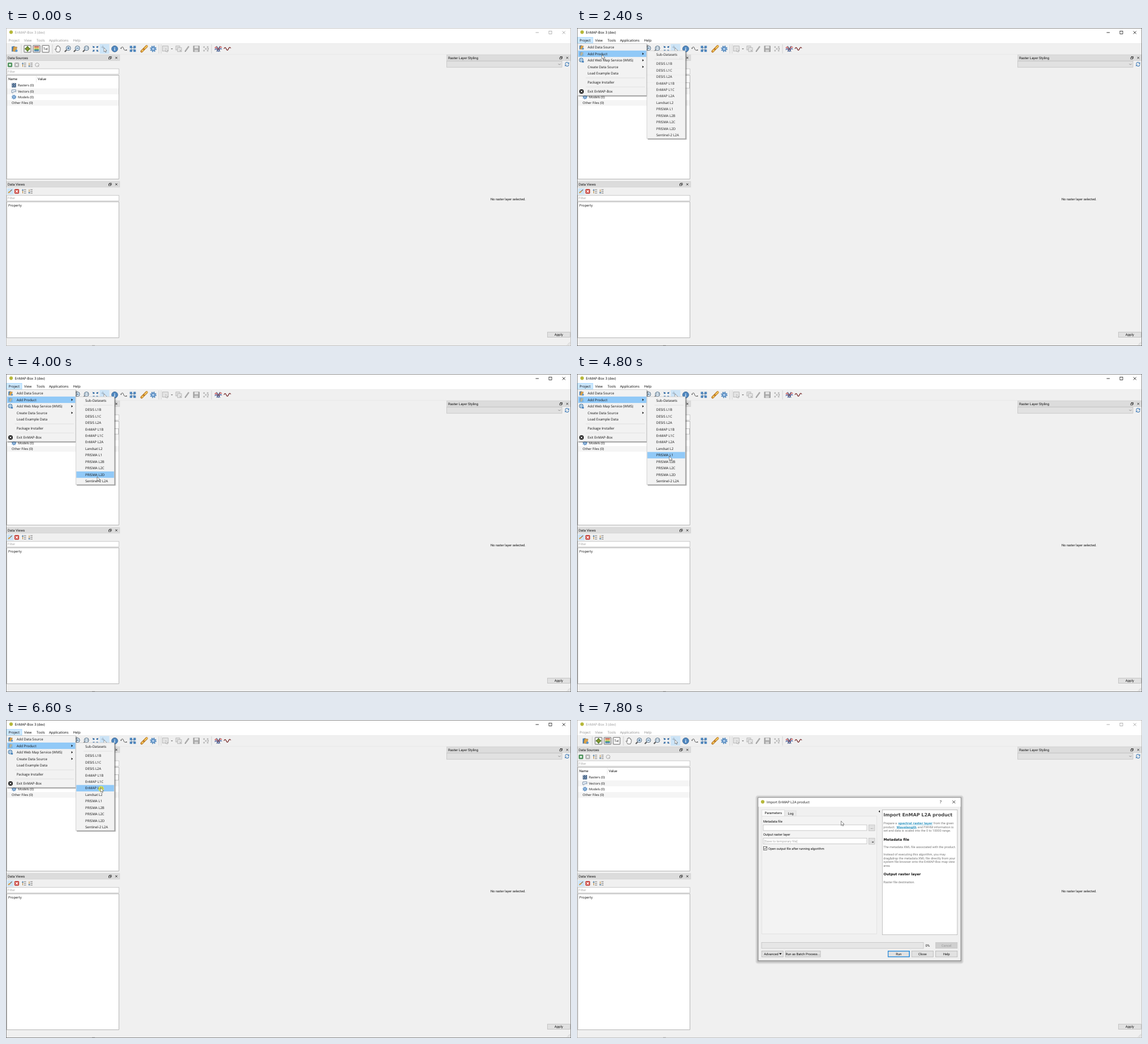
Recreate the animation shown at these times as an HTML page. Size 998x561 px, loop 8000 ms.

```html
<!DOCTYPE html>
<html lang="en">
<head>
<meta charset="utf-8">
<title>EnMAP-Box product import</title>
<style>
html, body { margin: 0; width: 100%; height: 100%; overflow: hidden; background: #f0f0f0; }
svg { display: block; width: 100%; height: 100%; }
text { font-family: "Open Sans", "Noto Sans", sans-serif; white-space: pre; text-rendering: geometricPrecision; }
.ui { font-family: Roboto, Arial, sans-serif; }
.b { font-family: "DejaVu Sans", sans-serif; font-weight: bold; }
</style>
</head>
<body>
<svg id="stage" viewBox="0 0 998 561"></svg>
<script>
const BLUE = '#4f86bd', INK = '#111', GRAY = '#a5a5a5', PICK = '#91c9f7';

// Drawing helpers
const rect = (x, y, w, h, fill, stroke = 'none', more = '') =>
  `<rect x="${x}" y="${y}" width="${w}" height="${h}" fill="${fill}" stroke="${stroke}" stroke-width=".7" ${more}/>`;
const line = (d, stroke = INK, w = 0.8, fill = 'none', more = '') =>
  `<path d="${d}" fill="${fill}" stroke="${stroke}" stroke-width="${w}" ${more}/>`;
const shape = (d, fill) => `<path d="${d}" fill="${fill}"/>`;
const disc = (x, y, r, fill, stroke = 'none', w = 0.8) =>
  `<circle cx="${x}" cy="${y}" r="${r}" fill="${fill}" stroke="${stroke}" stroke-width="${w}"/>`;
const text = (x, y, s, size = 6.05, fill = INK, more = '') =>
  `<text x="${x}" y="${y}" font-size="${size}" fill="${fill}" ${more}>${s}</text>`;
const ui = (x, y, s, size = 5.7, fill = INK, more = '') => text(x, y, s, size, fill, 'class="ui" ' + more);
const bold = (x, y, s, size, fill) => text(x, y, s, size, fill, 'class="b"');
const at = (x, y, body) => `<g transform="translate(${x} ${y})">${body}</g>`;
const group = (id, body) => `<g id="${id}">${body}</g>`;
const cross = (x, y, r, stroke = INK, w = 0.8) =>
  line(`M${x - r} ${y - r}l${2 * r} ${2 * r}m0 ${-2 * r}l${-2 * r} ${2 * r}`, stroke, w);

// Icons, centred on 0,0
const gear = r => disc(0, 0, r * 0.55, '#a9c8e8', BLUE, r * 0.28) +
  disc(0, 0, r * 0.85, 'none', BLUE, r * 0.3).replace('/>', ` stroke-dasharray="${r * 0.334}"/>`);
const lens = mark => line('M-2 2l-3.2 3.2', '#555', 2) + disc(1.2, -1.2, 4, '#dcebf7', '#52697f', 1) + mark;
const boxed = body => rect(-6, -6, 12, 12, '#fff', '#222', 'rx=".5"') + body;
const squares = (c, s) => [-1, 1].map(i => [-1, 1].map(j =>
  rect(i * 3.2 - s / 2, j * 3.2 - s / 2, s, s, c)).join('')).join('');
const sheets = shape('M-5 -4l5 -1v9l-5 1z', BLUE) + shape('M-1.5 -4l6 1l-2 8l-6 -1z', '#dba349') +
  line('M-1.5 -4l6 1l-2 8l-6 -1z', '#765c37', .5) + disc(3.4, 3.3, 2.2, '#5c98cf');
const pointer = line('M0 0V9l2 -1.8l1.4 3l1.5 -.7l-1.4 -2.9h2.8z', '#222', .6, '#fff');
const wave = (c, dy = 0) => line(`M-6 ${dy}q2 -5 4 0t4 0t4 -1`, c, 1.2);
const vector = line('M-4 2.5V-1.5q0 -1.5 2 -1h5.5v3.5h-4l-1.2 2z', '#657b96', .8, '#e4edf6');
const raster = rect(-3.7, -3.7, 7.4, 7.4, '#26466d') +
  [0, 1, 2, 3].map(i => rect(-3.2 + i % 2 * 3.4, -3.2 + (i >> 1) * 3.4, 1.6, 1.6, '#dce7f2') +
    rect(-1.5 + i % 2 * 3.4, -1.5 + (i >> 1) * 3.4, 1.4, 1.4, '#86a9cc')).join('');
const tree = up => [-3, 0, 3].map(y => line(`M-.5 ${y}h4`, '#777', 1)).join('') +
  line(`M-2.5 3.5v-7${up ? '' : 'm0 7'}`, '#b88432', 1) +
  shape(up ? 'M-4.2 -1.5l1.7 -2.7l1.7 2.7z' : 'M-4.2 1.5l1.7 2.7l1.7 -2.7z', '#4c82b6');
const floatBox = (x, y) => rect(x - 1, y - 2, 3.2, 3, 'none', INK) + rect(x - 2.3, y - .6, 3.2, 2.8, '#eee', INK);
const brush = line('M-3.5 2.5L0 0', '#d99531', 2) + line('M0 0l3 -3', '#76532f', 1.1);

const tools = [
  [15, sheets],
  [38, boxed(shape('M0 -5l5 5l-5 5l-5 -5z', '#608f30') + disc(0, 0, 2, '#efc948') + line('M-5 0h10M0 -5v10', '#335520', .7))],
  [54, boxed(['#b74a3c', '#e4b440', '#4c9c58', '#3976ad'].map((c, i) => rect(-4.3, -4.5 + i * 2.3, 8.6, 1.9, c)).join(''))],
  [70, boxed(text(0, 2.1, 'Txt', 6, INK, 'text-anchor="middle"'))],
  [92, line('M-2.5 5.5q-1.5 -3 -3 -5q1.2 -1.3 2.4 .6V-4q1.1 -1.6 1.8 0V-5.3q1.1 -1.2 1.8 0V-4.5q1.2 -1 1.8 .5V-2.5q1.1 -.9 1.7 .4q.4 5 -1.7 7.6z', '#333', .7, '#fff')],
  [109, lens(line('M-1 -1.2h4.4m-2.2 -2.2v4.4', '#325f8c', 1))],
  [125, lens(line('M-1 -1.2h4.4', '#325f8c', 1))],
  [141, lens(text(-1.5, .6, '1:1', 4.3, '#222'))],
  [158, squares(BLUE, 3) + line('M-5 -5l3 3M5 -5l-3 3M5 5l-3 -3M-5 5l3 -3', '#315d8b', 1) + rect(-1.5, -2, 4, 3, '#f1f5f9')],
  [174, rect(-8.5, -8.5, 17, 17, '#cce4f7') + line('M-6 -3h5M-3 -6v5', '#8596a4', .6) + at(-1, -2, `<g transform="scale(.8)">${pointer}</g>`)],
  [192, disc(0, 0, 5.4, '#4f87bf', '#315f90') + text(0, 2.8, 'i', 8, '#fff', 'text-anchor="middle" font-weight="700"')],
  [208, line('M-5 -1q3 -5 4.5 0t5 3', '#555', 1) + disc(-4.7, -1, .9, '#444') + disc(4.8, 2, .9, '#444')],
  [224, squares(BLUE, 4.3) + rect(-2, -2, 4, 4, '#e9f1f8', '#44698e')],
  [244, line('M-4.5 4.5l9 -9', '#bd7922', 4.2, 'none', 'stroke-linecap="round"') + line('M-4.5 4.5l3 -3m2 -2l5 -5', '#f9d46b', 1.8)],
  [260, gear(5.8)],
  [282, rect(-5.5, -5, 10, 9, '#e4e4e4', GRAY) + at(0, -1, `<g opacity=".45" transform="scale(.7)">${pointer}</g>`)],
  [293, shape('M-1.8 -.8h3.6l-1.8 2z', '#777')],
  [305, rect(-5, -5, 7, 7, '#e2e2e2', GRAY) + rect(-2, -2, 7, 7, '#e8e8e8', GRAY) + cross(3, 3, 1.5, GRAY)],
  [320, line('M-3.5 4.5L3 -4.5', '#aaa', 2.4) + line('M-4 5.3l1 -1.4', '#777', 1)],
  [336, rect(-5, -5, 10.5, 10, '#aaa', '#888') + rect(-3, -5, 6.5, 4, '#e5e5e5') + rect(-3, 1.5, 6, 3.5, '#d4d4d4')],
  [353, squares('#b7b7b7', 2.6) + disc(0, 0, 1.6, '#bbb') + disc(4, 0, 1.2, '#aaa')],
  [375, wave('#c33a3a', -1) + wave('#334e93', 2) + line('M-3 -5l6 10M3 -5l-6 10', '#304d78', 1)],
  [391, wave('#701e1e')]
];

const dockTitle = (x, y, w, s) => rect(x, y - 5, w, 10, '#dcdcdc', '#cecece') + ui(x + 2.6, y + 2.1, s, 6.05) +
  floatBox(x + w - 17, y) + cross(x + w - 6, y, 1.7, INK, .8);
const field = (x, y, w, h, hint = '') => rect(x, y, w, h, '#fff', '#b5b5b5') + ui(x + 1.5, y + h / 2 + 2.1, hint, 5.8, '#aaa');
const button = (x, y, w, s, stroke = '#adadad', fill = '#e1e1e1', ink = INK) =>
  rect(x, y, w, 10.5, fill, stroke) + ui(x + w / 2, y + 7.3, s, 5.8, ink, 'text-anchor="middle"');

const chrome = rect(0, 0, 998, 27, '#fff') + disc(9, 7.3, 3.1, '#b6b83b') +
  group('caption', text(15.5, 10.2, 'EnMAP-Box 3 (dev)', 6.1, 'currentColor') +
    line('M935.5 8h5.5', 'currentColor') + rect(959, 5.5, 5, 5, 'none', 'currentColor') + cross(985.3, 8, 2.5, 'currentColor')) +
  group('hot', rect(1, 16.5, 27, 10.5, '#cce8ff', '#99d1ff')) +
  group('menubar', [[4.5, 'Project'], [32, 'View'], [54, 'Tools'], [76, 'Applications'], [118.5, 'Help']]
    .map(([x, s]) => text(x, 23.8, s, 6.05, 'currentColor')).join(''));

const toolbar = line('M0 27.5h998M0 46.5h998', '#e4e4e4', .6) +
  [27, 82, 270, 274, 363].map(x => line(`M${x} 29v16`, '#c6c6c6', .7)).join('') +
  tools.map(([x, body]) => at(x, 36.8, body)).join('');

const sources = dockTitle(.4, 52.6, 200.5, 'Data Sources') +
  at(7, 65, rect(-3.6, -3.6, 7.2, 7.2, '#529b61', '#367644', 'rx="1"') + line('M-2 0h4M0 -2v4', '#fff', 1.3)) +
  at(19, 65, rect(-3.6, -3.6, 7.2, 7.2, '#bbb', '#999', 'rx="1"') + cross(0, 0, 1.7, '#fff', 1.2)) +
  at(32, 65, tree(true)) + at(43.5, 65, tree(false)) +
  at(55, 65, disc(0, 0, 3.3, 'none', '#aaa', 1) + line('M.8 .8l2.6 2.6', '#aaa', 1)) +
  field(1.5, 72, 198, 9.6, 'Filter') + rect(1.5, 83.5, 198, 183, '#fff', '#999') +
  rect(2, 106.5, 197, 10.5, '#f5f5f5') + rect(2, 127.2, 197, 10, '#f5f5f5') +
  ui(4, 92, 'Name', 6) + ui(56, 92, 'Value', 6) + line('M53.5 84v12', '#ddd', .6) +
  group('focus', rect(10, 96.3, 188.7, 9.8, 'none', '#aaa')) +
  at(14, 101, raster) + at(14, 111.5, vector) + at(14, 121.8, gear(4.2)) +
  ['Rasters (0)', 'Vectors (0)', 'Models (0)', 'Other Files (0)']
    .map((s, i) => text(i < 3 ? 21 : 10, 103.2 + i * 10.4, s, 5.8)).join('');

const views = dockTitle(.4, 275.8, 200.5, 'Data Views') +
  rect(1.8, 282.8, 11.5, 10.8, '#cce4f7') + at(7.5, 288.2, brush) +
  at(19, 288.2, rect(-3.7, -3.7, 7.4, 7.4, '#d3443e', '#a52c28', 'rx="1"') + cross(0, 0, 2, '#fff', 1.3)) +
  at(32, 288.2, tree(true)) + at(43.5, 288.2, tree(false)) +
  field(1.5, 295.2, 198, 9.8, 'Filter') + rect(1.5, 306.8, 198, 239.5, '#fff', '#999') + text(4, 315.3, 'Property', 5.9);

const styling = dockTitle(778.4, 52.6, 219, 'Raster Layer Styling') +
  rect(778.5, 58.6, 203.5, 10.6, '#e1e1e1', '#bdbdbd') + line('M975.5 63l2 2l2 -2', '#777') +
  at(991, 64, line('M-3.2 -.5a3.2 3.2 0 0 1 5.8 -1.5M3.2 .5a3.2 3.2 0 0 1 -5.8 1.5', BLUE, 1.3) +
    shape('M3.8 -3.8v3.2h-3.2zM-3.8 3.8V.6h3.2z', BLUE)) +
  ui(856, 304.3, 'No raster layer selected.', 5.75) + rect(956.5, 536.7, 40, 8.8, '#e1e1e1', '#b5b5b5') +
  ui(976.3, 543.2, 'Apply', 6, INK, 'text-anchor="middle"') +
  line('M991 559.5l5.5 -5.5m-3 5.5l3 -3', '#bbb', .7) + line('M152 560.3h5', '#777', .8);

// Popup menus: each entry is [row centre, label, opens submenu]
const mainRows = [[34, 'Add Data Source'], [45.4, 'Add Product', 1], [57, 'Add Web Map Service (WMS)', 1],
  [68.4, 'Create Data Source', 1], [80, 'Load Example Data'], [96, 'Package Installer'], [112, 'Exit EnMAP-Box']];
const subRows = ['DESIS L1B', 'DESIS L1C', 'DESIS L2A', 'EnMAP L1B', 'EnMAP L1C', 'EnMAP L2A', 'Landsat L2',
  'PRISMA L1', 'PRISMA L2B', 'PRISMA L2C', 'PRISMA L2D', 'Sentinel-2 L2A'].map((s, i) => [63 + i * 11.45, s]);
subRows.unshift([47.2, 'Sub-Datasets']);

const popup = (id, x, y, w, h, tx, rows, seps, extra = '') => group(id,
  rect(x + 2, y + 2, w + 1, h, '#000', 'none', 'opacity=".18"') + rect(x + 1.5, y + 1.5, w, h, '#000', 'none', 'opacity=".3"') +
  rect(x, y, w, h, '#f2f2f2', '#c4c4c4') + rect(x + 1, 0, w - 1.5, 11.3, PICK, 'none', `id="${id}Pick"`) + extra +
  seps.map(s => line(`M${tx - 3} ${s}H${x + w - 3}`, '#d5d5d5', .6)).join('') +
  rows.map(([c, s, more]) => text(tx, c + 2.2, s) + (more ? shape(`M${x + w - 7.5} ${c - 2}l2.6 2l-2.6 2z`, INK) : '')).join(''));

const menus = popup('menu', 1, 27.6, 122, 91.4, 18.7, mainRows, [88, 104],
    at(8, 34, `<g transform="scale(.75)">${sheets}</g>`) +
    at(8, 45.4, `<g transform="scale(.7)" opacity=".5">${sheets}</g>`) +
    at(8, 57, disc(-.5, -.5, 3.6, '#8bb5d9', '#49749a') + line('M-4 -.5h7M-.5 -4v7', '#e5eef5', .6) + disc(2.5, 2.5, 1.8, BLUE)) +
    at(8, 112, disc(0, 0, 4, '#292929') + cross(0, 0, 1.6, '#fff', 1))) +
  popup('sub', 123.3, 40, 68, 155, 140, subRows, [55]);

const help = rect(539.3, 158.5, 132.5, 220.3, '#fff', '#aaa') +
  bold(541.3, 169.8, 'Import EnMAP L2A product', 8, '#444') +
  ui(541.3, 184, 'Prepare a', 5.6, '#777') + bold(567.5, 184, 'spectral raster layer', 5.25, '#2f94c0') +
  ui(629.6, 184, 'from the given', 5.6, '#777') + line('M567.5 185h60.5M564.6 191.5h35.4', '#2f94c0', .5) +
  ui(541.3, 190.6, 'product.', 5.6, '#777') + bold(564.6, 190.6, 'Wavelength', 5.25, '#2f94c0') +
  ui(601.6, 190.6, 'and FWHM information is', 5.6, '#777') +
  bold(541.6, 212.5, 'Metadata file', 6.05, INK) + bold(541.6, 274.2, 'Output raster layer', 6.05, INK) +
  [[197.3, 'set and data is scaled into the 0 to 10000 range.'],
    [226, 'The metadata XML file associated with the product.'],
    [239, 'Instead of executing this algorithm, you may'],
    [245.7, 'drag&amp;drop the metadata XML file directly from your'],
    [252.4, 'system file browser onto the EnMAP-Box map view'],
    [259.1, 'area.'], [288, 'Raster file destination.']].map(([y, s]) => ui(541.3, y, s, 5.6, '#777')).join('');

const dialog = group('dialog',
  [5, 4, 3, 2, 1].map(r => rect(320 - r, 137.5 - r, 358 + 2 * r, 288 + 2 * r, '#000', 'none', `rx="${r}" opacity=".05"`)).join('') +
  rect(320, 137, 358, 287.7, '#f0f0f0', '#666') + rect(320.4, 137.4, 357.2, 15.6, '#fff') + disc(328, 144.3, 3.1, '#b6b83b') +
  text(335, 147, 'Import EnMAP L2A product', 6) + text(640.7, 147.3, '?', 7.2) + cross(665.7, 144.6, 2.5) +
  rect(326.3, 169.5, 203, 207.7, '#f3f3f3', '#dcdcdc') + rect(367, 160, 20, 9.5, '#eaeaea', '#d7d7d7') +
  rect(326.3, 158.6, 40.3, 11.2, '#fafafa', '#d7d7d7') + ui(331.6, 166.4, 'Parameters', 5.9) + ui(372.6, 166.8, 'Log', 5.9) +
  ui(329, 181, 'Metadata file', 5.8) + field(329, 185, 183, 10, '') + button(515.5, 185, 10.5, '...', '#bbb') +
  ui(329, 204.3, 'Output raster layer', 5.8) + field(329, 208.6, 183, 10, '[Save to temporary file]') +
  button(515.5, 208.6, 10.5, '..', '#bbb') + shape('M521 214.8h3.4l-1.7 1.8z', INK) +
  rect(329.4, 223.3, 6, 6, '#fff', '#333') + line('M330.6 226.3l1.4 1.5l2.7 -3.4') +
  ui(338, 228.6, 'Open output file after running algorithm', 5.65) +
  shape('M535 159.3v4l-2.3 -2z', INK) + help +
  rect(326, 392.4, 286, 10.6, '#e6e6e6', '#bcbcbc') + ui(615.5, 400, '0%', 5.9) +
  button(633.4, 392.4, 38.4, 'Cancel', '#c5c5c5', '#cfcfcf', '#999') +
  button(326.2, 407.5, 38, 'Advanced   ') + shape('M357 411.3h4.6l-2.3 3z', INK) +
  button(368, 407.5, 62, 'Run as Batch Process...') + button(591.2, 407.5, 38, 'Close') + button(633.4, 407.5, 38.4, 'Help') +
  button(549.3, 407.5, 38, 'Run', '#0078d7') + rect(549.8, 408, 37, 9.5, 'none', '#0078d7'));

const stage = document.getElementById('stage');
stage.innerHTML = rect(0, 0, 998, 561, '#f0f0f0') + chrome + toolbar + sources + views + styling +
  group('frame', rect(.3, .3, 997.4, 560.4, 'none', 'currentColor')) + menus + dialog +
  group('cursor', `<circle id="halo" r="5" cx="1" cy="2" fill="#f4ee20" opacity=".65"/><g transform="scale(.87)">${pointer}</g>`);

const el = id => document.getElementById(id);
const show = (id, on) => el(id).setAttribute('opacity', +on);
const tint = (id, c) => el(id).setAttribute('color', c);

const LOOP = 8000, STEP = 200;
const path = [[200, 774, 440], [1200, 14, 23], [1600, 15, 23], [2000, 44, 47], [2400, 44, 47], [3000, 130, 46],
  [3600, 164, 180], [4000, 161, 181], [4200, 162, 187], [4800, 163, 145], [5400, 165.5, 117], [6000, 165.5, 117],
  [6400, 167, 119.5], [7200, 167, 119.5], [7800, 466.5, 178.2]];

function cursorAt(t) {
  let i = 1;
  while (i < path.length - 1 && t > path[i][0]) i++;
  const [t0, x0, y0] = path[i - 1], [t1, x1, y1] = path[i];
  const u = Math.min(1, Math.max(0, (t - t0) / (t1 - t0))), e = u * u * (3 - 2 * u);
  return [x0 + (x1 - x0) * e, y0 + (y1 - y0) * e];
}

function pick(id, rows, y) {
  const row = rows.find(r => Math.abs(r[0] - y) <= 5.75);
  show(id, !!row);
  if (row) el(id).setAttribute('y', row[0] - 5.6);
}

function draw(t) {
  const [x, y] = cursorAt(t);
  const active = t >= 1400 && t < 7000, open = t >= 1400 && t < 6800;
  tint('caption', active ? '#000' : '#999');
  tint('menubar', active ? '#000' : '#8c8c8c');
  tint('frame', active ? '#555' : '#aaa');
  show('focus', active);
  show('hot', t >= 1200 && t < 6800);
  show('menu', open && (t < 1600 ? 0.3 : 1));
  show('sub', open && t >= 2400 && (t < 2600 ? 0.94 : 1));
  pick('menuPick', mainRows, t >= 2000 ? 45.4 : y);
  pick('subPick', subRows, x > 123 ? y : -99);
  show('dialog', t >= 7000);
  show('cursor', t >= 200);
  show('halo', t >= 1400 && t < 1600 || t >= 6600 && t < 6800 ? 0.65 : 0);
  el('cursor').setAttribute('transform', `translate(${x} ${y})`);
}

const start = performance.now();
function tick() {
  const t = (performance.now() - start) % LOOP;
  draw(Math.floor(t / STEP) * STEP);
  requestAnimationFrame(tick);
}
tick();
</script>
</body>
</html>
```
